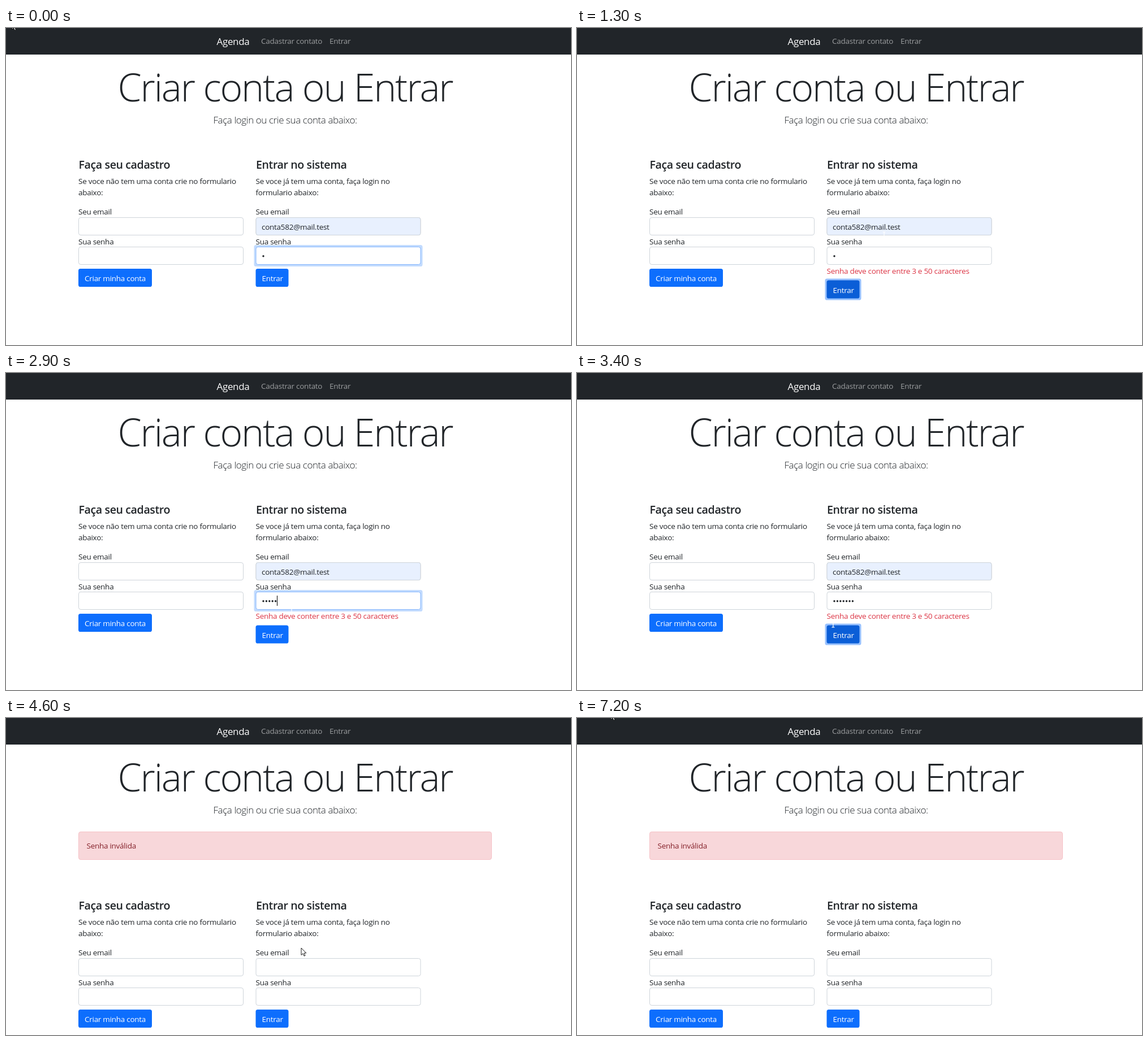
Recreate the animation shown at these times as an HTML page. Size 999x561 px, loop 7.3 s.

```html
<!DOCTYPE html>
<html lang="pt">
<head>
<meta charset="utf-8">
<title>Agenda</title>
<style>
html, body { margin: 0; width: 100%; height: 100%; overflow: hidden; background: #fff; }
svg { display: block; }
text { font: 13.5px "Open Sans", "Noto Sans", sans-serif; letter-spacing: -.02em; fill: #212529; }
.title { font-size: 68px; font-weight: 300; letter-spacing: -.0325em; text-anchor: middle; }
.lead { font-size: 17px; font-weight: 300; letter-spacing: -.025em; text-anchor: middle; }
.head { font-size: 19.6px; font-weight: 600; }
.brand { font-size: 17px; fill: #fff; }
.link { fill: #9b9d9f; }
.light { fill: #fff; }
.error { fill: #dc3545; }
.warn { fill: #842029; }
.field { fill: #fff; stroke: #ced4da; }
.filled { fill: #e8f0fe; }
.active { stroke: #86b7fe; }
.button { fill: #0d6efd; }
.button.pressed { fill: #0b5ed7; }
.glow { fill: #c2dbfe; }
.halo { fill: #98c1fe; }
.alert { fill: #f8d7da; stroke: #f5c2c7; }
.pointer { fill: #fff; stroke: #000; stroke-width: .9; stroke-linejoin: round; }
.beam { fill: none; stroke: #fff; stroke-width: 1.2; }
</style>
</head>
<body>
<svg id="stage" width="999" height="561"></svg>
<script>
const text = (x, y, s, cls = '') => `<text x="${x}" y="${y}" class="${cls}">${s}</text>`;
const rect = (x, y, w, h, cls = '', id = '') =>
  `<rect id="${id}" x="${x}" y="${y}" width="${w}" height="${h}" rx="3.6" class="${cls}"/>`;
const group = (id, body) => `<g id="${id}">${body}</g>`;
const ring = (x, y, w, h, cls) => rect(x - 3, y - 3, w + 6, h + 6, cls);
const field = (x, y, cls = '') => rect(x + .5, y + .5, 291, 31, 'field ' + cls);
const button = (x, w, label, id) => rect(x, 426, w, 32, 'button', id) + text(x + 11, 448, label, 'light');

const left = 128, right = 441.5, email = 335, password = 387;
const column = (x, head, line1, line2) =>
  text(x + .5, 249, head, 'head') + text(x, 276, line1) + text(x, 296, line2) +
  text(x, 330, 'Seu email') + field(x, email) +
  text(x, 382.5, 'Sua senha') + field(x, password);

stage.innerHTML =
  '<path d="M0 0H999V47H0Z" fill="#212529"/>' +
  text(372.5, 30, 'Agenda', 'brand') +
  text(451, 28, 'Cadastrar contato', 'link') + text(572, 28, 'Entrar', 'link') +
  text(493.5, 130, 'Criar conta ou Entrar', 'title') +
  text(493.5, 168.5, 'Faça login ou crie sua conta abaixo:', 'lead') +
  group('alert', rect(128.5, 201.5, 730, 49, 'alert') + text(142.5, 231, 'Senha inválida', 'warn')) +
  group('forms',
    column(left, 'Faça seu cadastro', 'Se voce não tem uma conta crie no formulario', 'abaixo:') +
    button(left, 130, 'Criar minha conta', 'signup') +
    column(right, 'Entrar no sistema', 'Se voce já tem uma conta, faça login no', 'formulario abaixo:') +
    group('filled', field(right, email, 'filled') + text(452, 356.5, 'conta582@mail.test')) +
    group('focused', ring(right, password, 292, 32, 'glow') + field(right, password, 'active')) +
    group('dots', '') +
    group('caret', '<path d="M0 394V412" stroke="#000"/>') +
    group('error', text(right, 435, 'Senha deve conter entre 3 e 50 caracteres', 'error')) +
    group('enter', group('halo', ring(right, 426, 58, 32, 'halo')) + button(right, 58, 'Entrar', 'login'))) +
  group('cursor',
    '<path id="arrow" class="pointer" d="M0 0V12.5L3 9.8 5 14.2 7 13.4 5 9H8.8Z"/>' +
    '<path id="hand" class="pointer" d="M-1 1Q0-1 1 1V5L7 6.5Q8.5 7 8 10L7 14H1L-4 8Q-4 6-1 8Z"/>' +
    '<path id="beam" class="beam" d="M-2.5-6H2.5M0-6V6M-2.5 6H2.5"/>');

const $ = id => document.getElementById(id);
const show = (id, on) => $(id).setAttribute('display', on ? 'inline' : 'none');
const shift = (id, x, y) => $(id).setAttribute('transform', `translate(${x} ${y})`);

const loop = 7300, step = 100, longestMove = 600;
const submit1 = 700, rejected = 900, refocus = 2100, typing = 2700, submit2 = 3300, reload = 4600;

// Where the pointer has arrived at each time
const stops = [
  { at: 0, x: 10.5, y: -10 },
  { at: submit1, x: 466, y: 440 },
  { at: 1300, x: 543, y: 367 },
  { at: 2000, x: 520, y: 404 },
  { at: submit2, x: 462, y: 455 },
  { at: 3600, x: 427, y: 412 },
  { at: 4400, x: 486, y: 412 },
  { at: reload, x: 522, y: 407 },
  { at: 5000, x: 522, y: 407 },
  { at: 5600, x: 234, y: 234 },
  { at: 6200, x: 140, y: 222 },
  { at: 6500, x: 253, y: 229 },
  { at: 6800, x: 586, y: 322 },
  { at: 7200, x: 60, y: -10 }
];

function pointerAt(t) {
  const i = stops.findIndex(s => s.at >= t);
  const to = stops[i], from = stops[i - 1] || to;
  const length = Math.min(longestMove, to.at - from.at) || 1;
  const k = Math.max(0, 1 - (to.at - t) / length);
  const ease = k * k * (3 - 2 * k);
  return [from.x + (to.x - from.x) * ease, from.y + (to.y - from.y) * ease];
}

function typedCount(t) {
  if (t >= reload) return 0;
  return t < typing ? 1 : Math.min(7, 3 + (t - typing) / step);
}

function draw(now) {
  const t = Math.floor(now % loop / step) * step;
  const failed = t >= reload;
  const invalid = t >= rejected && !failed;
  const typable = t >= refocus && t < submit2;
  const inPassword = t < submit1 || typable;
  const inButton = !inPassword && !failed;
  const count = typedCount(t);
  const drop = invalid ? 20.5 : 0;

  const [x, y] = pointerAt(t);
  const inside = (x0, y0, x1, y1) => x >= x0 && x <= x1 && y >= y0 && y <= y1;
  const onButton = !failed && inside(441, 426 + drop, 499, 458 + drop);
  const onText = failed ? inside(143, 216, 229, 236) : t >= submit1 && !onButton;

  show('alert', failed);
  shift('forms', 0, failed ? 90 : 0);
  show('filled', !failed);
  show('focused', inPassword);
  show('error', invalid);
  shift('enter', 0, drop);
  show('halo', inButton);
  $('login').classList.toggle('pressed', inButton || onButton);
  $('dots').innerHTML = Array.from({ length: count },
    (_, i) => `<circle cx="${455 + 5.4 * i}" cy="403.7" r="1.7" fill="#212529"/>`).join('');
  show('caret', typable && (t >= typing || t < refocus + 400));
  shift('caret', 452.5 + 5.4 * count, 0);

  shift('cursor', x, y);
  show('arrow', !onButton && !onText);
  show('hand', onButton);
  show('beam', onText);
}

function tick() {
  draw(performance.now());
  requestAnimationFrame(tick);
}
tick();
</script>
</body>
</html>
```
